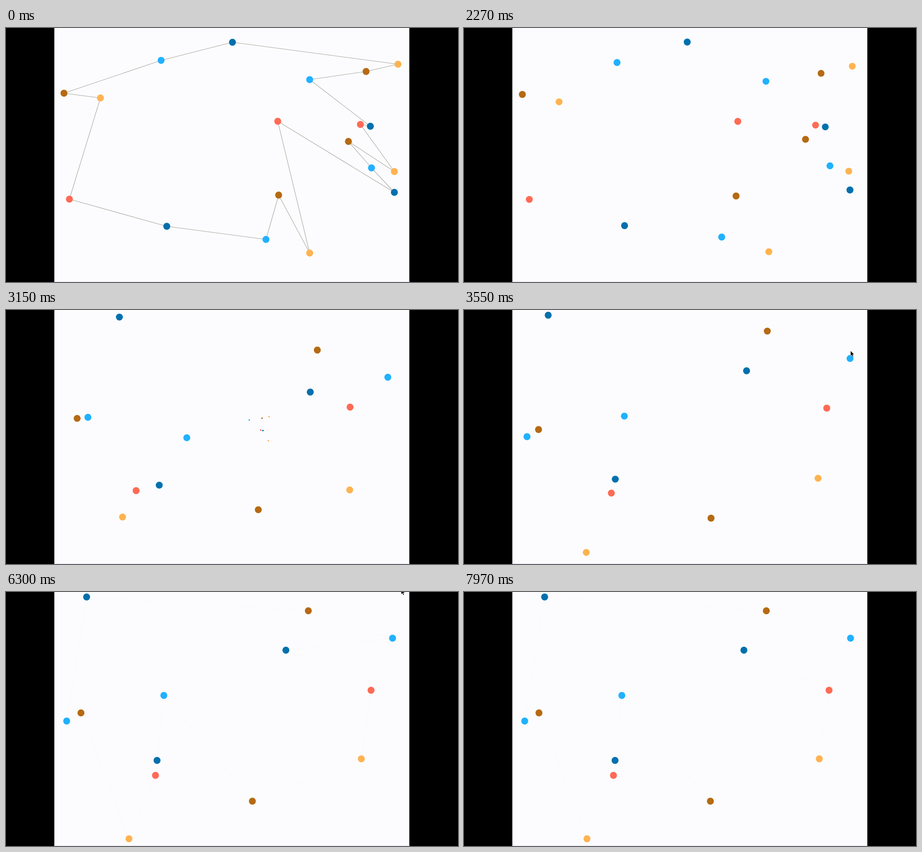
Animation, 998 px wide and 561 px high, one loop 8 s. Source, as an HTML page:

```html
<!DOCTYPE html>
<html lang="en">
<head>
<meta charset="utf-8">
<title>Points and paths</title>
<style>
  html, body { margin: 0; width: 100%; height: 100%; overflow: hidden; background: #000; }
  svg { display: block; width: 100vw; height: 100vh; }
</style>
</head>
<body>
<svg viewBox="0 0 998 561">
  <rect width="998" height="561" fill="#000"/>
  <rect x="106.7" width="783.8" height="561" fill="#fcfcfe"/>
  <rect x="106.7" y="560" width="783.8" height="1" fill="#dcdcfa"/>
  <g id="lines" stroke="#aaa7a0" stroke-width="1.1"></g>
  <g id="dots"></g>
  <path id="cursor" d="M0 0V11.6L2.7 9.2L4.6 13.4L6.5 12.6L4.7 8.5H8.2Z" fill="#000" stroke="#fff" stroke-width=".6"/>
</svg>
<script>
const LOOP = 8000;
const COLORS = ['#0070ad', '#21b1ff', '#b56a13', '#ffb351', '#ff6a55'];
const RADIUS = 7.7;
const CENTER = [498.5, 280.5];

// Key points of the two closed tours, in drawing order.
// Points without a partner in the second tour shrink into the centre.
const FIRST = [
  [500, 31.5], [342.5, 71.5], [128, 144], [208.5, 154.5], [140, 378], [355, 438], [574, 467],
  [602, 369], [670.5, 497], [600, 206], [857.5, 363], [807, 309], [756, 250.5],
  [857.5, 317], [782.5, 213], [804.5, 217], [670.5, 114], [795, 96], [865.5, 80]
];
const SECOND = [
  [178, 11], [134, 285], [165.5, 267], [271.5, 545], [330, 405], [333.5, 372], [348.5, 228.5],
  [544, 462], [784.5, 368.5], [806, 217], [618, 128.5], [853.5, 102], [667.5, 41.5]
];

const CLEAR = 1650;
const MOVE = { start: 1917, length: 2000 };
const DRAW = { start: 4107, stagger: 56, length: 500 };
const BLINK = { start: 5775, period: 500, length: 220 };
const CURSOR = { show: 3450, start: 3560, length: 300, hide: 6440 };

const clamp = v => Math.min(1, Math.max(0, v));
const mix = (a, b, k) => a + (b - a) * k;
const mixPoint = (a, b, k) => [mix(a[0], b[0], k), mix(a[1], b[1], k)];
const cubicInOut = v => v < .5 ? 4 * v ** 3 : 1 - 4 * (1 - v) ** 3;
const smooth = v => v * v * (3 - 2 * v);
const progress = (t, { start, length }) => clamp((t - start) / length);
const byId = id => document.getElementById(id);

function add(parent, name, attrs = {}) {
  const node = document.createElementNS('http://www.w3.org/2000/svg', name);
  set(node, attrs);
  return byId(parent).appendChild(node);
}
function set(node, attrs) {
  for (const key in attrs) node.setAttribute(key, attrs[key]);
}
function show(node, visible) {
  node.style.display = visible ? '' : 'none';
}

const lines = FIRST.map(() => add('lines', 'line'));
const dots = FIRST.map((_, i) => add('dots', 'circle', { fill: COLORS[i % COLORS.length] }));

function drawDots(t) {
  const k = cubicInOut(progress(t, MOVE));
  dots.forEach((dot, i) => {
    const [cx, cy] = mixPoint(FIRST[i], SECOND[i] || CENTER, k);
    set(dot, { cx, cy, r: SECOND[i] ? RADIUS : RADIUS * (1 - k) });
  });
}

function drawLines(t) {
  const complete = t < CLEAR;
  const tour = complete ? FIRST : SECOND;
  lines.forEach((line, i) => {
    const k = complete ? 1 : cubicInOut(progress(t - i * DRAW.stagger, DRAW));
    const visible = i < tour.length && k > 0;
    show(line, visible);
    if (!visible) return;
    const from = tour[i];
    const [x2, y2] = mixPoint(from, tour[(i + 1) % tour.length], k);
    set(line, { x1: from[0], y1: from[1], x2, y2 });
  });
  set(byId('lines'), { opacity: blink(t - BLINK.start) });
}

// Fades out and in by turns, once per period.
function blink(time) {
  if (time < 0) return 1;
  const turn = Math.floor(time / BLINK.period);
  const k = smooth(clamp((time % BLINK.period) / BLINK.length));
  return turn % 2 ? k : 1 - k;
}

function drawCursor(t) {
  const cursor = byId('cursor');
  const [x, y] = mixPoint([853.5, 90], [872.5, -6.5], smooth(progress(t, CURSOR)));
  show(cursor, t >= CURSOR.show && t < CURSOR.hide);
  set(cursor, { transform: `translate(${x} ${y})` });
}

const origin = performance.now();
function tick() {
  const t = (performance.now() - origin) % LOOP;
  drawDots(t);
  drawLines(t);
  drawCursor(t);
  requestAnimationFrame(tick);
}
tick();
</script>
</body>
</html>
```
